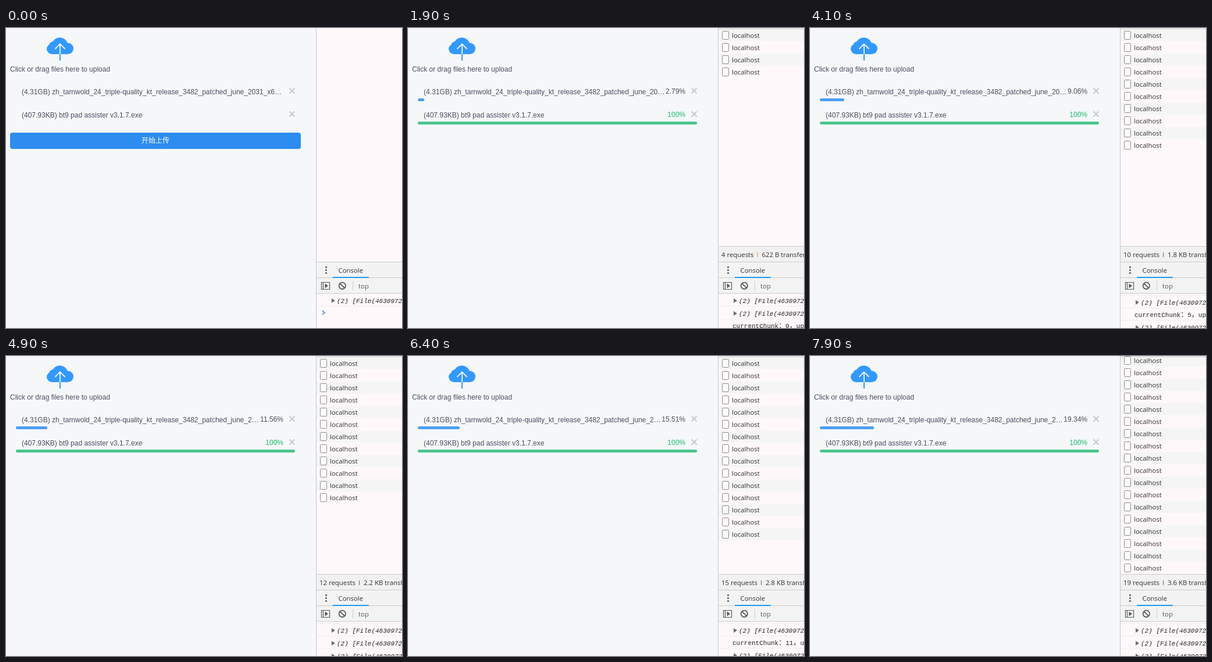
Recreate the animation shown at these times as an HTML page. Size 681 px wide and 516 px high, loop 8000 ms.

```html
<!DOCTYPE html>
<html lang="zh-CN">
<head>
<meta charset="utf-8">
<title>Chunked upload</title>
<style>
  html, body { margin: 0; width: 100%; height: 100%; overflow: hidden; background: #f5f7f9; }
  #stage { position: relative; width: 681px; height: 516px; overflow: hidden;
    font: 12px/16px "Liberation Sans", Arial, "Noto Sans CJK SC", sans-serif; color: #495060; }
  svg { position: absolute; left: 0; top: 0; }
  .note, .file, #start { position: absolute; white-space: pre; }
  .note { left: 7px; top: 63px; }
  .file { left: 27px; width: 450px; display: flex; }
  .name { flex: 1; min-width: 0; overflow: hidden; text-overflow: ellipsis; }
  .pct { position: relative; top: -1px; }
  .done { color: #19be6b; }
  #start { left: 7px; top: 180px; width: 500px; height: 28px; line-height: 28px; border-radius: 4px;
    background: #2d8cf0; color: #fff; text-align: center; }
  .ui { font: 11.4px "Open Sans", "Noto Sans", sans-serif; fill: #303030; }
  .log { font: 11px "Liberation Mono", monospace; fill: #222; }
  .log .obj { font-style: italic; }
  .log .wide { font: 12px "Noto Sans CJK SC", "Noto Sans CJK", sans-serif; }
</style>
</head>
<body>
<div id="stage">
  <svg width="681" height="516" viewBox="0 0 681 516">
    <rect width="681" height="516" fill="#f5f7f9"/>

    <!-- upload cloud -->
    <g fill="#3399ff">
      <circle cx="79" cy="36" r="9"/>
      <circle cx="80.5" cy="29.5" r="6"/>
      <circle cx="92.5" cy="30.5" r="14"/>
      <circle cx="106.3" cy="35.3" r="9.7"/>
      <rect x="79" y="30" width="27" height="15"/>
      <rect x="92" y="45" width="2" height="11"/>
    </g>
    <path d="M93 45V27.5M84.5 36L93 27.5L101.5 36" fill="none" stroke="#f5f7f9" stroke-width="1.8"/>

    <!-- remove buttons -->
    <path d="M487.5 103.5l9 9m0-9l-9 9M487.5 143.5l9 9m0-9l-9 9" stroke="#c8cacd" stroke-width="2.2"/>

    <g id="bars">
      <rect id="bar1" x="17" y="121" height="5" rx="2.5" fill="#4e9ff0"/>
      <rect id="bar2" x="17" y="161" height="5" rx="2.5" fill="#4cc48c"/>
    </g>

    <!-- developer panel -->
    <rect x="534" width="147" height="516" fill="#fff8fa"/>
    <g id="net">
      <g id="rows" class="ui"></g>
      <path d="M534 1.5H681" stroke="#cccccc"/>
      <rect x="534" y="375" width="147" height="28" fill="#f1f1f1"/>
      <path d="M534 375.5H681" stroke="#cccccc"/>
      <g class="ui">
        <text id="count" x="539" y="394"></text>
        <rect id="split" y="386" width="1.2" height="8"/>
        <text id="bytes" y="394"></text>
      </g>
    </g>

    <g id="log" class="log"></g>

    <rect x="534" y="402" width="147" height="55" fill="#f3f3f3"/>
    <path d="M534 402.5H681M534 429.5H681M534 456.5H681M596.5 435V451" stroke="#cccccc"/>
    <rect x="562" y="428" width="62" height="2" fill="#1a9cf0"/>
    <g fill="#5a5a5a">
      <circle cx="550.5" cy="411.5" r="1.6"/>
      <circle cx="550.5" cy="416.5" r="1.6"/>
      <circle cx="550.5" cy="421.5" r="1.6"/>
      <path d="M548.5 439.5L554 443.5L548.5 447.5Z"/>
    </g>
    <g fill="none" stroke="#5a5a5a">
      <path d="M542.5 437.5h14v12h-14zM545.5 437.5v12" stroke-width="1.2"/>
      <path d="M574 439l8.6 8.6" stroke-width="1.8"/>
      <circle cx="578.3" cy="443.3" r="5.7" stroke-width="1.8"/>
    </g>
    <text class="ui" x="571.5" y="421">Console</text>
    <text class="ui" x="606" y="448" style="fill:#5a5a5a">top</text>
    <path d="M533.5 0V516" stroke="#c4c8cc"/>
  </svg>

  <div class="note">Click or drag files here to upload</div>
  <div class="file" style="top:102px">
    <span class="name">(4.31GB) zh_tarnwold_24_triple-quality_kt_release_3482_patched_june_2031_x64.iso</span>
    <span class="pct" id="pct1"></span>
  </div>
  <div class="file" style="top:142px">
    <span class="name">(407.93KB) bt9 pad assister v3.1.7.exe</span>
    <span class="pct" id="pct2"></span>
  </div>
  <div id="start">开始上传</div>
</div>

<script>
const LOOP = 8000, STEP = 100, BEGIN = 900, ROW = 21;

// [time, value] pairs, linear in between
const percent = [[900, 0], [1900, 2.79], [2800, 5.43], [4100, 9.06], [4900, 11.56], [6400, 15.51], [7900, 19.34]];
const barEnd = [[900, 17], [1700, 25], [1900, 28], [2600, 38], [2800, 41], [3500, 51], [4100, 59], [4400, 63],
  [4900, 71], [5300, 76], [6200, 87], [6400, 89], [7100, 100], [7900, 110]];
const logTop = [[1900, 0], [2800, 8], [4100, 21], [4900, 31], [6400, 45], [7900, 59]];
// moments at which each request is listed
const requests = [1000, 1100, 1500, 1800, 2300, 2700, 3000, 3400, 3700, 4000, 4500, 4800,
  5400, 5800, 6200, 6700, 7100, 7400, 7800];

const $ = id => document.getElementById(id);
const show = (id, on) => { $(id).style.display = on ? '' : 'none'; };

function at(keys, t) {
  if (t <= keys[0][0]) return keys[0][1];
  for (let i = 1; i < keys.length; i++) {
    const [t0, v0] = keys[i - 1], [t1, v1] = keys[i];
    if (t <= t1) return v0 + (v1 - v0) * (t - t0) / (t1 - t0);
  }
  return keys[keys.length - 1][1];
}

function drawRequests(n) {
  const scroll = Math.max(0, 2 + n * ROW - 375);
  let html = '';
  for (let i = 0; i < n; i++) {
    const y = 2 + i * ROW - scroll;
    const grey = (i % 2 === 0) !== (scroll > 0);
    html += `<rect x="534" y="${y}" width="147" height="${ROW}" fill="${grey ? '#f5f5f5' : '#fff8fa'}"/>
      <rect x="540.5" y="${y + 3.5}" width="11" height="14" rx="1" fill="#fdfbfc" stroke="#8c8c8c"/>
      <text x="557" y="${y + 15}">localhost</text>`;
  }
  $('rows').innerHTML = html;

  const size = Math.round(207.4 * Math.max(0, n - 1));
  const split = n > 9 ? 607 : 600.5;
  $('count').textContent = `${n} requests`;
  $('bytes').textContent = (size < 1000 ? `${size} B` : `${(Math.floor(size / 102.4) / 10).toFixed(1)} KB`) + ' transferred';
  $('split').setAttribute('x', split);
  $('split').setAttribute('fill', n < 9 ? '#e8a33c' : '#777777');
  $('bytes').setAttribute('x', split + 8);
}

// Every fourth log line, counted from the third, reports a chunk
const isChunk = k => k % 4 === 2;

function logLine(k, y) {
  if (isChunk(k)) {
    return `<text x="558" y="${y + 14}">currentChunk<tspan class="wide">：</tspan>${Math.floor(k / 4)}<tspan class="wide">，</tspan>uploaded</text>`;
  }
  return `<path d="M560 ${y + 7}l6 4l-6 4z" fill="#6e6e6e"/>
    <text class="obj" x="569" y="${y + 15}">(2) [File(4630972416), File(417722)]</text>`;
}

function drawLog(t) {
  const first = Math.floor(at(logTop, t) + 1e-6);
  const last = t < 1000 ? 1 : t < 1800 ? 2 : Infinity;
  let y = first ? 461 : 458, k = first, html = '';
  if (first) html += `<path d="M534 ${y - 0.5}H681" stroke="#f0eced"/>`;
  for (; k < last && y < 516; k++) {
    html += logLine(k, y);
    y += isChunk(k) ? 21 : 22;
    html += `<path d="M534 ${y - 1.5}H681" stroke="#f0eced"/>`;
  }
  if (y < 506) html += `<path d="M544 ${y + 6}l4 3.5l-4 3.5" fill="none" stroke="#367cf1" stroke-width="1.6"/>`;
  $('log').innerHTML = html;
}

function draw(t) {
  const busy = t >= BEGIN;
  const n = requests.filter(r => r <= t).length;
  show('start', !busy);
  show('bars', busy);
  show('net', busy);

  $('pct1').textContent = busy ? at(percent, t).toFixed(2) + '%' : '';
  $('pct2').textContent = busy ? (t < 1000 ? '0%' : '100%') : '';
  $('pct2').className = t < 1000 ? 'pct' : 'pct done';
  $('bar1').setAttribute('width', at(barEnd, t) - 17);
  $('bar2').setAttribute('width', at([[900, 0], [1200, 480]], t));

  drawRequests(n);
  drawLog(t);
}

const t0 = performance.now();
let shown = -1;
function tick() {
  const t = Math.floor(((performance.now() - t0) % LOOP) / STEP) * STEP;
  if (t !== shown) draw(shown = t);
  requestAnimationFrame(tick);
}
tick();
</script>
</body>
</html>
```
